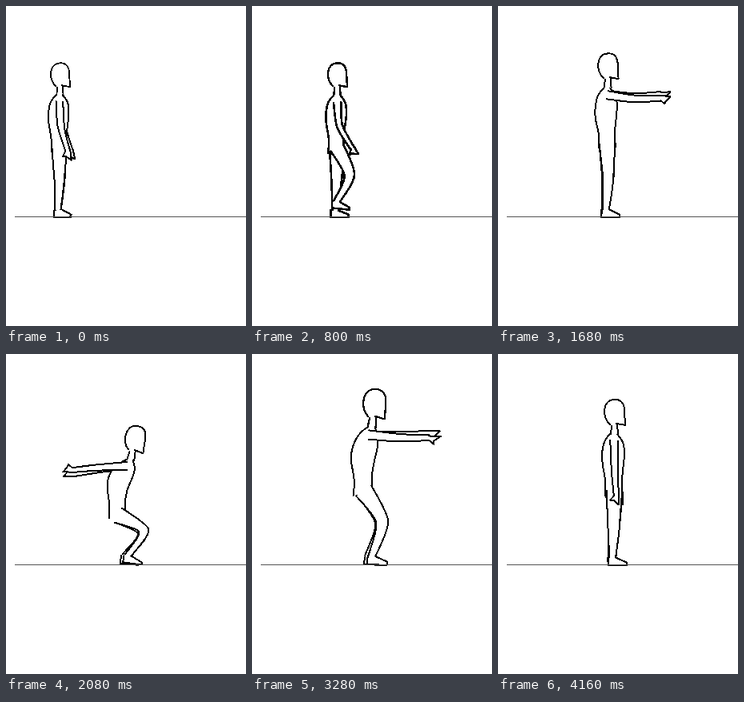
Write an HTML page that moves like this. It is 300 by 400 pixels and loops after 4240 ms.

```html
<!DOCTYPE html>
<html lang="en">
<head>
<meta charset="utf-8">
<title>Backflip sketch</title>
<style>
html, body { margin: 0; width: 100%; height: 100%; overflow: hidden; background: #fff; }
svg { display: block; width: 300px; height: 400px; }
path { fill: none; stroke: #000; stroke-linecap: round; stroke-linejoin: round; shape-rendering: crispEdges; }
.cover { fill: #fff; stroke: none; }
</style>
</head>
<body>
<svg viewBox="0 0 300 400">
  <g id="figure"></g>
  <rect x="11" y="263" width="289" height="1" fill="#555"/>
</svg>
<script>
const STEP = 80, STEPS = 53, GROUND = 264, FOOT = 9;
const TAKEOFF = 31, LANDING = 39, HOLD = 46;
const figure = document.getElementById('figure');

const clamp = v => Math.max(0, Math.min(1, v));

// Linear track through [step, value] points
const track = (...keys) => i => {
  const n = Math.max(1, keys.findIndex(k => k[0] >= i));
  const [a, va] = keys[n - 1], [b, vb] = keys[n];
  return va + (vb - va) * clamp((i - a) / (b - a));
};

const hipX = track([0, 67], [10, 106], [16, 121], [22, 139], [26, 141], [31, 143], [35, 165], [41, 140], [52, 145]);
const size = track([0, .93], [16, .93], [22, 1], [31, 1], [41, 1.12], [52, 1]);
const crouch = track([0, 0], [12, 0], [16, .25], [22, 0], [26, .9], [28, 1], [31, 0], [35, 1.65],
  [39, .6], [41, .5], [45, .9], [49, .35], [52, 0]);
const armSwing = track([0, 2], [10, 4], [16, -8], [22, 98], [26, -88], [28, -80], [31, 165], [35, 0],
  [40, 85], [45, 85], [52, 0]);
const elbowBend = track([0, 14], [3, 30], [10, 30], [16, 50], [22, 4], [31, 4], [35, 110], [40, 5], [52, 5]);

function poseAt(step) {
  const i = step === HOLD ? step - 1 : step;
  const bend = crouch(i);
  const reach = clamp(Math.min(i / 3, (17 - i) / 4));
  const phase = Math.PI * (i - 10) / 6;
  const flight = clamp((i - TAKEOFF) / (LANDING - TAKEOFF));
  const rise = 4 * flight * (1 - flight);

  const leg = (p, spread) => {
    const pass = Math.max(0, Math.cos(p)) * reach;
    return [72 * bend + 24 * reach * Math.sin(p) + 30 * pass + spread,
      Math.min(112 * bend, 122) + 58 * pass + 3];
  };
  const arm = (p, spread) => [armSwing(i) - 26 * reach * Math.sin(p) + spread, elbowBend(i)];

  return {
    x: hipX(i), y: rise ? 168 - 154 * rise : null,
    size: size(i), bend, torso: -13 * bend, spin: 360 * flight,
    weight: 2 + .6 * reach + .8 * rise,
    legs: [leg(phase + Math.PI, -5 * bend), leg(phase, 0)],
    arms: [arm(phase + Math.PI, 4 - 20 * reach), arm(phase, 0)]
  };
}

// Angles run counter-clockwise from straight down
const go = (p, deg, len) => {
  const r = deg * Math.PI / 180;
  return [p[0] + Math.sin(r) * len, p[1] + Math.cos(r) * len];
};
const angle = (a, b) => Math.atan2(b[0] - a[0], b[1] - a[1]) * 180 / Math.PI;
const noise = n => { const v = Math.sin(n * 12.9898) * 43758.5453; return v - Math.floor(v) - .5; };

// Smooth curve through the middles of a polyline
const curve = pts => pts.slice(1).reduce((d, q, j) => {
  const next = pts[j + 2];
  return d + (next ? `Q${q} ${(q[0] + next[0]) / 2},${(q[1] + next[1]) / 2}` : `L${q}`);
}, `M${pts[0]}`);

function draw(step) {
  const p = poseAt(step), k = p.size;
  let seed = step * 100;
  const rough = pts => pts.map(q => q.map(v => +(v + 1.4 * noise(++seed)).toFixed(1)));
  const stroke = d => `<path d="${d}" stroke-width="${p.weight / 1}"/>`;
  const cover = d => `<path d="${d}" class="cover"/>`;

  // White body between two inked sides, open at both ends
  const form = (a, b) => {
    const one = curve(rough(a)), two = curve(rough(b));
    return cover('M' + [...a, ...b.slice().reverse()].join(' ')) + stroke(one) + stroke(two);
  };
  const outline = pts => {
    const d = 'M' + rough(pts).join(' ');
    return cover(d) + stroke(d);
  };

  const chain = (start, bones) => bones.reduce((pts, [deg, len]) =>
    [...pts, go(pts[pts.length - 1], deg + p.spin, len * k)], [start]);
  const legChain = (hip, [thigh, knee]) => {
    const shin = thigh - knee, flat = p.y === null ? .15 : .6;
    return chain(hip, [[thigh, 42], [shin, 42], [90 + Math.min(0, shin * flat), 18]]);
  };

  let y = p.y;
  if (y === null) {
    const low = p.legs.flatMap(l => legChain([0, 0], l).slice(2).map(q => q[1]));
    y = GROUND - FOOT * k - Math.max(...low);
  }
  const hip = [p.x, y], up = 180 + p.torso + p.spin;
  const along = (h, w) => {
    const bow = -9 * p.bend * Math.sin(Math.PI * clamp(h / 70));
    return go(go(hip, up, h * k), up - 90, (w + bow) * k);
  };
  const neck = along(71, 0), shoulder = along(62, 0);

  const limb = (pts, widths) => {
    const side = s => pts.map((q, j) => {
      const ahead = angle(pts[Math.max(0, j - 1)], pts[Math.min(pts.length - 1, j + 1)]);
      return go(q, ahead + 90 * s, widths[j] * k);
    });
    // Double the joints so that the curve stays near them
    const full = s => side(s).flatMap((q, j, all) => j && j < all.length - 1 ?
      [-1, 1].map(d => q.map((v, c) => v + .2 * (all[j + d][c] - v))) : [q]);
    return form(full(1), full(-1));
  };
  const leg = l => {
    const [h, kn, an, toe] = legChain(hip, l);
    const fwd = angle(an, toe), depth = FOOT * k;
    const heel = go(an, fwd + 180, 5);
    return limb([h, kn, an], [10, 7, 4]) +
      outline([heel, go(heel, fwd - 90, depth), go(toe, fwd - 90, depth), go(toe, fwd - 90, depth - 3), go(an, fwd, 5)]);
  };
  const arm = ([upper, elbow]) => {
    const [s, e, w, tip] = chain(shoulder, [[upper, 34], [upper + elbow, 34], [upper + elbow + 8, 12]]);
    const fwd = angle(e, w);
    return limb([s, e, w], [5, 4, 3]) +
      outline([go(w, fwd + 90, 3), tip, go(w, fwd - 35, 7), go(w, fwd - 60, 9), go(w, fwd - 90, 3)]);
  };
  const trunk = () => form(
    [along(71, 4), along(64, 10), along(52, 13), along(34, 12), along(14, 9), along(-5, 11)],
    [along(71, -4), along(65, -11), along(50, -15), along(32, -15), along(12, -10), along(-6, -11)]);
  const head = () => {
    const face = 'M-5-12C-15-20-15-42 0-43C10-44 13-36 13-29L14-11 3-13';
    return `<g transform="translate(${neck}) rotate(${-(p.torso + p.spin)}) scale(${k})">` +
      cover(face) + stroke(face + 'M-4 0-3-10M5 0 4-12') + '</g>';
  };

  return arm(p.arms[0]) + leg(p.legs[0]) + trunk() + leg(p.legs[1]) + arm(p.arms[1]) + head();
}

let shown = -1;
function tick() {
  const step = Math.floor(performance.now() / STEP) % STEPS;
  if (step !== shown) {
    shown = step;
    figure.innerHTML = draw(step);
  }
  requestAnimationFrame(tick);
}
tick();
</script>
</body>
</html>
```
